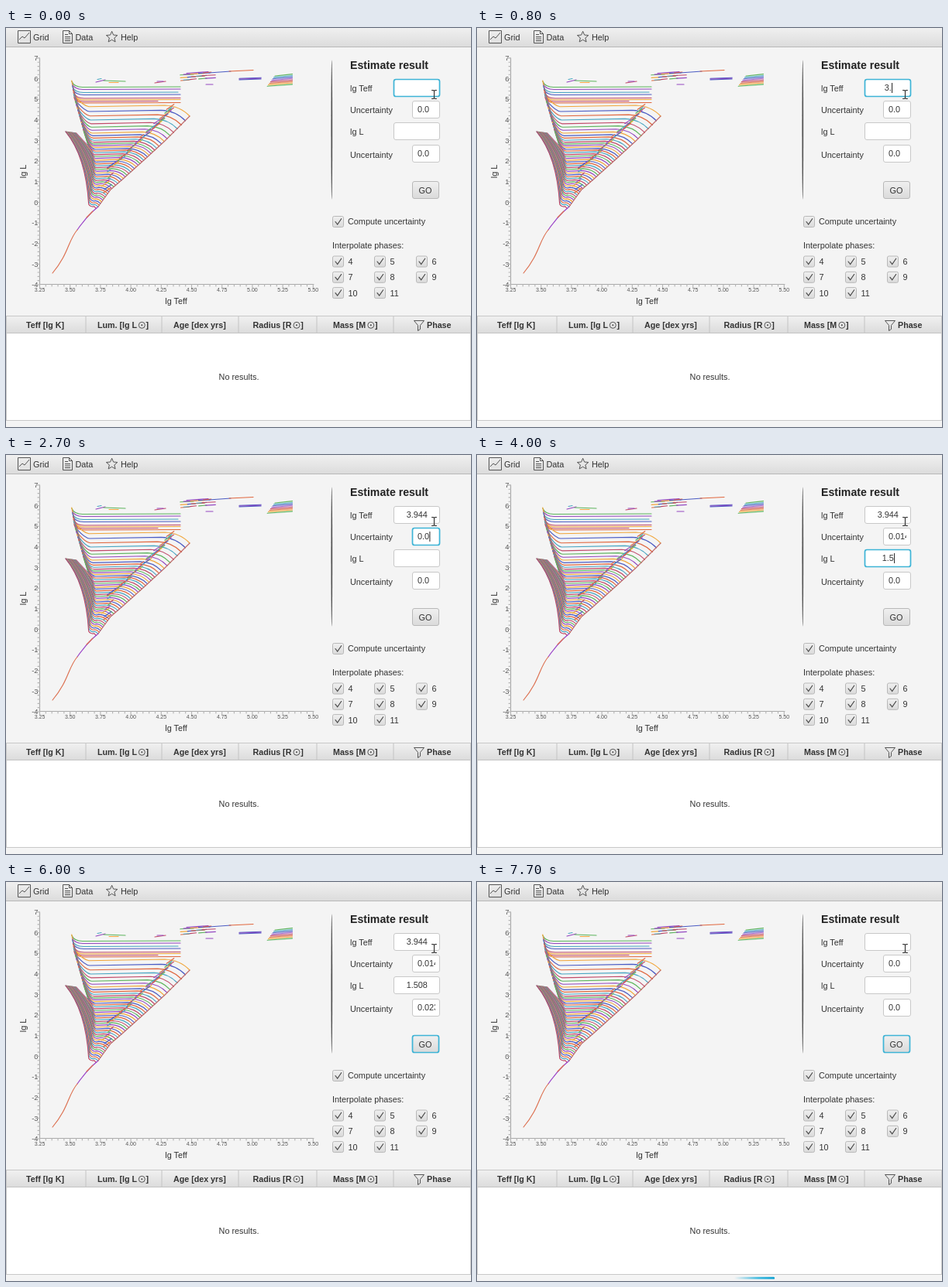
These frames come from a looping animation (600x516 px, 8000 ms). An HTML page:

```html
<!DOCTYPE html>
<html lang="en">
<head>
<meta charset="utf-8">
<title>Stellar parameter estimate</title>
<style>
html, body { margin: 0; width: 100%; height: 100%; overflow: hidden; background: #f4f4f4; }
svg { display: block; width: 600px; height: 516px; }
text { font: 10.85px "Liberation Sans", Arial, sans-serif; fill: #333; white-space: pre; }
.bold { font-weight: bold; font-size: 10.7px; }
.title { font-weight: bold; font-size: 14.1px; fill: #222; }
.xtick { font-size: 7px; fill: #555; text-anchor: middle; }
.ytick { font-size: 9.3px; fill: #555; text-anchor: end; }
.mid { text-anchor: middle; }
.line { fill: none; stroke-width: 1.15; stroke-linecap: round; }
.icon { fill: none; stroke: #555; stroke-width: 1; }
</style>
</head>
<body>
<svg id="stage" viewBox="0 0 600 516">
  <defs>
    <linearGradient id="bar" x2="0" y2="1"><stop stop-color="#f0f0f0"/><stop offset="1" stop-color="#dcdcdc"/></linearGradient>
    <linearGradient id="button" x2="0" y2="1"><stop stop-color="#f0f0f0"/><stop offset="1" stop-color="#dadada"/></linearGradient>
    <linearGradient id="glow"><stop stop-color="#1aa9d6" stop-opacity="0"/><stop offset=".6" stop-color="#1fb0dc" stop-opacity=".85"/><stop offset="1" stop-color="#0b9fd0"/></linearGradient>
  </defs>
</svg>
<script>
const stage = document.getElementById('stage');
const NS = 'http://www.w3.org/2000/svg';

function add(tag, attrs, content, parent = stage) {
  const el = document.createElementNS(NS, tag);
  for (const key in attrs) el.setAttribute(key, attrs[key]);
  if (content !== undefined) el.textContent = content;
  return parent.appendChild(el);
}
const label = (x, y, s, cls = '') => add('text', { x, y, class: cls }, s);
const rect = (x, y, width, height, fill, more = {}) => add('rect', { x, y, width, height, fill, ...more });
const line = (d, stroke, more = {}) => add('path', { d, stroke, class: 'line', ...more });
const icon = (d, more = {}) => add('path', { d, class: 'icon', ...more });

// Linear interpolation through [key, value] points with rising keys
function lerp(points, key) {
  let i = 1;
  while (i < points.length - 1 && points[i][0] < key) i++;
  const [a, va] = points[i - 1], [b, vb] = points[i];
  return va + (vb - va) * (key - a) / (b - a);
}

let seed = 7;
const random = () => (seed = seed * 16807 % 2147483647) / 2147483647;

const colors = ['#e0673f', '#f0a63a', '#5cb45c', '#47a5c2', '#4b5cc4', '#9447c0', '#c04868'];
const color = i => colors[i % colors.length];

function drawToolbar() {
  rect(0, 0, 600, 24, 'url(#bar)');
  rect(0, 24, 600, 1, '#b8b8b8');
  icon('M15.5 3.5h16v16h-16zM17 15l4-4 3 2 6-7');
  icon('M73.5 3.5h8l4 4v12h-12zM81.5 3.5v4h4M76 8.5h4M76 11.5h7M76 14h7M76 16.5h7', { 'stroke-width': 1.2 });
  let star = '';
  for (let i = 0; i < 10; i++) {
    const r = i % 2 ? 3.4 : 7.6, a = i * Math.PI / 5;
    star += (i ? 'L' : 'M') + (136.6 + r * Math.sin(a)) + ' ' + (11.8 - r * Math.cos(a));
  }
  icon(star + 'Z');
  label(35, 16, 'Grid');
  label(89.5, 16, 'Data');
  label(148, 16, 'Help');
}

function drawAxes() {
  const yOf = v => 225.4 - 26.64 * v;
  line('M43.5 39V331.5H397', '#aaa', { 'stroke-width': 1 });
  let ticks = '', minor = '';
  for (let v = -4; v <= 7; v++) {
    ticks += `M39 ${yOf(v)}h4.5`;
    label(41.5, yOf(v) + 3.2, v, 'ytick');
    if (v < 7) for (let k = 1; k < 5; k++) minor += `M41 ${yOf(v + k / 5)}h2.5`;
  }
  for (let i = 0; i < 10; i++) {
    const x = 43.5 + 39.2 * i;
    ticks += `M${x} 331.5v4`;
    label(x, 341, (3.25 + i / 4).toFixed(2), 'xtick');
    if (i < 9) for (let k = 1; k < 5; k++) minor += `M${x + k * 7.84} 331.5v2.5`;
  }
  line(ticks + minor, '#b5b5b5', { 'stroke-width': .8 });
  label(219.5, 356.5, 'lg Teff', 'mid');
  add('text', { transform: 'translate(26 185.5) rotate(-90)', class: 'mid' }, 'lg L');
}

function drawTracks() {
  const zams = [[114, 237], [126, 226], [146, 205], [169, 180], [196, 150], [209, 135], [218, 128], [231, 119], [238, 111]];
  const edge = [[70, 85], [90, 88], [104, 92], [128, 99], [150, 104], [172, 109]];

  // Massive stars: long flat tracks
  const rows = [[76, 225], [79, 225], [83, 222], [86, 225], [90.5, 225], [92.5, 225], [94.5, 196], [96.5, 225]];
  rows.forEach(([y, right], i) => {
    const x = lerp(edge, y - 7);
    line(`M${x} ${y - 7}Q${x + 3} ${y + .5} ${x + 14} ${y + .5}L${right} ${y}`, color([2, 5, 3, 4, 6, 1, 6, 0][i]));
  });

  let i = 5;
  for (let y = 114; y < 235; y += Math.max(2.15, 6 - (y - 114) * .085), i++) {
    const x = lerp(zams, y);
    const h = lerp([[114, 14], [170, 11], [210, 6], [238, 2]], y);
    const flat = y - h;
    const dip = lerp([[100, 106], [130, 110], [160, 115], [190, 117], [215, 115], [234, 111]], flat);
    const bend = Math.max(dip + 2, x - 2.3 * h);
    let d = `M${x} ${y}Q${x - h * .9} ${y - h * .95} ${bend} ${flat}L${dip + 1} ${flat + h / 8}`;
    if (flat > 166) {
      // Low-mass stars: giant branch fan
      const k = Math.min(1, (flat - 166) / 60), base = flat - h;
      d += `Q${dip - 3} ${flat + h / 5} ${dip - 5} ${base}`;
      d += `Q${106 - 3 * k} ${152 + 14 * k} ${91 - 14 * k} ${136 - 2 * k}`;
    } else {
      d += `Q${dip - 5} ${flat + 1} ${lerp(edge, flat - 10) + 2} ${flat - 10}L${lerp(edge, flat - 32)} ${flat - 32}`;
    }
    line(d, color(i * 3));
  }

  // Core helium burning loops
  const loop = [[0, 215], [.3, 190], [.6, 162], [.85, 136], [1, 128]];
  const loopY = [[0, 102], [.3, 128], [.6, 155], [.85, 179], [1, 210]];
  for (let n = 0; n < 50; n++) {
    const t = n / 49, x = lerp(loop, t) + random() * 6 - 3, y = lerp(loopY, t);
    const w = 1.5 + random() * 3.5;
    line(`M${x - w} ${y + w * .7}L${x + w} ${y - w * .7}`, color(n * 3), { 'stroke-width': 1.3 });
  }

  line('M119 231L111 238Q101 248 92 261', '#9a42c8');
  line('M237 114L205 146 180 169 150 196 135 209 119 231', '#c06a6a', { 'stroke-width': .8 });
  line('M112 237L104 245M92 261C80 275 81 292 60 317', '#dc7050', { 'stroke-width': 1.2 });
}

function drawHotStars() {
  const dash = (x, y, w, rise, c) => line(`M${x} ${y}l${w} ${-rise}`, color(c), { 'stroke-width': 1.4 });
  dash(116, 70, 12, 3, 5);
  dash(118, 66.5, 5, 1, 3);
  dash(126, 68, 28, -1, 2);
  dash(133, 70.5, 12, 0, 1);
  dash(192, 71, 14, 2, 6);
  dash(195, 69, 8, 0, 5);
  dash(258, 73, 9, 0, 5);
  for (let n = 0; n < 15; n++) {
    dash(221 + n % 5 * 8 + random() * 6, 68 - n * .72, 8 + random() * 10, .8, n * 3);
  }
  dash(233, 58.5, 28, 2, 5);
  dash(262, 58, 28, 2, 4);
  dash(288, 56, 31, 1.5, 0);
  for (let n = 0; n < 3; n++) dash(301, 65.2 + n * .9, 28, 1, 4 + n % 2);
  for (let n = 0; n < 8; n++) {
    const x = 347 - n * 1.4;
    dash(x, 62 + n * 1.9, 369.5 - x, 2.4, n + 2);
  }
}

const field = (x, y, w) => rect(x + .5, y + .5, w - 1, 22, '#fff', { rx: 2.5, stroke: '#c8c8c8' });

function check(x, y) {
  rect(x + .5, y + .5, 14, 14, 'url(#button)', { rx: 2, stroke: '#b8b8b8' });
  line(`M${x + 4} ${y + 7.5}l2.7 3.5 5-7.3`, '#444', { 'stroke-width': 1.8 });
}

function drawForm() {
  add('ellipse', { cx: 420.3, cy: 131.5, rx: .9, ry: 90, fill: '#555' });
  label(444, 53, 'Estimate result', 'title');
  [['lg Teff', 82], ['Uncertainty', 110], ['lg L', 137.5], ['Uncertainty', 168]].forEach(([s, y]) => label(444, y, s));
  check(421, 243);
  label(441, 254, 'Compute uncertainty');
  label(421, 285, 'Interpolate phases:');
  for (let n = 0; n < 8; n++) {
    const x = 421 + n % 3 * 54, y = 294.5 + Math.floor(n / 3) * 20.3;
    check(x, y);
    label(x + 20.5, y + 11.5, n + 4);
  }
}

function drawTable() {
  rect(0, 372.5, 600, 135, '#fff', { stroke: '#c8c8c8' });
  rect(0, 373, 600, 21, 'url(#bar)');
  rect(0, 394, 600, 1, '#c4c4c4');
  [103, 201, 300, 401, 500].forEach(x => rect(x - .5, 373, 1, 21, '#c4c4c4'));
  rect(0, 373, 1, 134, '#c8c8c8');
  rect(599, 373, 1, 134, '#c8c8c8');
  label(26, 388, 'Teff [lg K]', 'bold');
  label(216, 388, 'Age [dex yrs]', 'bold');
  label(543, 388, 'Phase', 'bold');
  [[118, 'Lum. [lg L', 175.3], [318.5, 'Radius [R', 375], [422, 'Mass [M', 470.8]].forEach(([x, s, sun]) => {
    label(x, 388, s, 'bold');
    add('circle', { cx: sun, cy: 384.3, r: 4, class: 'icon' });
    add('circle', { cx: sun, cy: 384.3, r: 1, fill: '#444' });
    label(sun + 5.2, 388, ']', 'bold');
  });
  icon('M526.5 378.5h13l-5 6v5l-3 2v-7z');
  label(300.5, 454.5, 'No results.', 'mid');
}

drawToolbar();
drawAxes();
drawTracks();
drawHotStars();
drawForm();
drawTable();

const boxes = [[500, 66, 60], [524, 94, 36], [500, 122, 60], [524, 151, 36]];
const inputs = boxes.map(([x, y, w]) => {
  field(x, y, w);
  const view = add('svg', { x: x + 6.5, y, width: w - 12.5, height: 23 });
  return add('text', { y: 15.3 }, '', view);
});
const button = rect(524.5, 198.5, 34, 22, 'url(#button)', { rx: 2.5, stroke: '#b8b8b8' });
label(541, 213.5, 'GO', 'mid');
const ring = rect(0, 0, 0, 22, 'none', { rx: 2.5, stroke: '#3db4d6', 'stroke-width': 1.7 });
const caret = rect(0, 0, 1, 13, '#222');
line('M549.5 80.5h2l1 1 1-1h2M552.5 81.5v9M549.5 91.5h2l1-1 1 1h2', '#333', { 'stroke-width': 1 });
const progress = rect(0, 510.8, 52, 2.8, 'url(#glow)', { rx: 1.2 });

// [time, focused control, four field values]
const steps = [
  [-600, 0, '', '0.0', '', '0.0'],
  [500, 0, '3', '0.0', '', '0.0'],
  [700, 0, '3.', '0.0', '', '0.0'],
  [1100, 0, '3.9', '0.0', '', '0.0'],
  [1300, 0, '3.94', '0.0', '', '0.0'],
  [1500, 0, '3.944', '0.0', '', '0.0'],
  [2300, 1, '3.944', '0.0', '', '0.0'],
  [3000, 1, '3.944', '0.01', '', '0.0'],
  [3200, 1, '3.944', '0.014', '', '0.0'],
  [3500, 2, '3.944', '0.014', '', '0.0'],
  [3700, 2, '3.944', '0.014', '1', '0.0'],
  [3800, 2, '3.944', '0.014', '1.', '0.0'],
  [3900, 2, '3.944', '0.014', '1.5', '0.0'],
  [4200, 2, '3.944', '0.014', '1.50', '0.0'],
  [4400, 2, '3.944', '0.014', '1.508', '0.0'],
  [4700, 3, '3.944', '0.014', '1.508', '0.0'],
  [5000, 3, '3.944', '0.014', '1.508', '0.02'],
  [5200, 3, '3.944', '0.014', '1.508', '0.023'],
  [5700, 4, '3.944', '0.014', '1.508', '0.023'],
  [6300, 4, '', '0.0', '', '0.0']
];
const slide = [[6600, -36], [6800, -6], [7000, 34], [7200, 152], [7400, 232], [7600, 300], [7700, 332]];
const last = (table, t) => table.filter(row => row[0] <= t).pop();
const textWidth = s => [...s].reduce((w, c) => w + (c === '.' ? .278 : .556), 0) * 10.85;

function render(t) {
  const [since, focus, ...values] = last(steps, t);
  values.forEach((value, i) => {
    const [x, y, w] = boxes[i], width = textWidth(value), inner = w - 12.5;
    let left = w === 60 ? (inner - width) / 2 : .5;
    if (i === focus) left = Math.min(left, inner - width - 1.5);
    if (inputs[i].textContent !== value) inputs[i].textContent = value;
    inputs[i].setAttribute('x', left);
    if (i === focus) {
      caret.setAttribute('x', x + 6.5 + left + width + .3);
      caret.setAttribute('y', y + 5);
    }
  });
  caret.style.display = focus < 4 && (t - since) % 1000 < 500 ? '' : 'none';

  const [x, y, w] = boxes[focus] || [524, 198, 35];
  ring.setAttribute('x', x + .5);
  ring.setAttribute('y', y + .5);
  ring.setAttribute('width', w - 1);
  button.setAttribute('fill', t >= 6200 && t < 6400 ? '#cfcfcf' : 'url(#button)');

  const place = last(slide, t);
  progress.style.display = place ? '' : 'none';
  if (place) progress.setAttribute('x', place[1]);
}

const start = performance.now();
function tick() {
  render((performance.now() - start) % 8000);
  requestAnimationFrame(tick);
}
tick();
</script>
</body>
</html>
```
